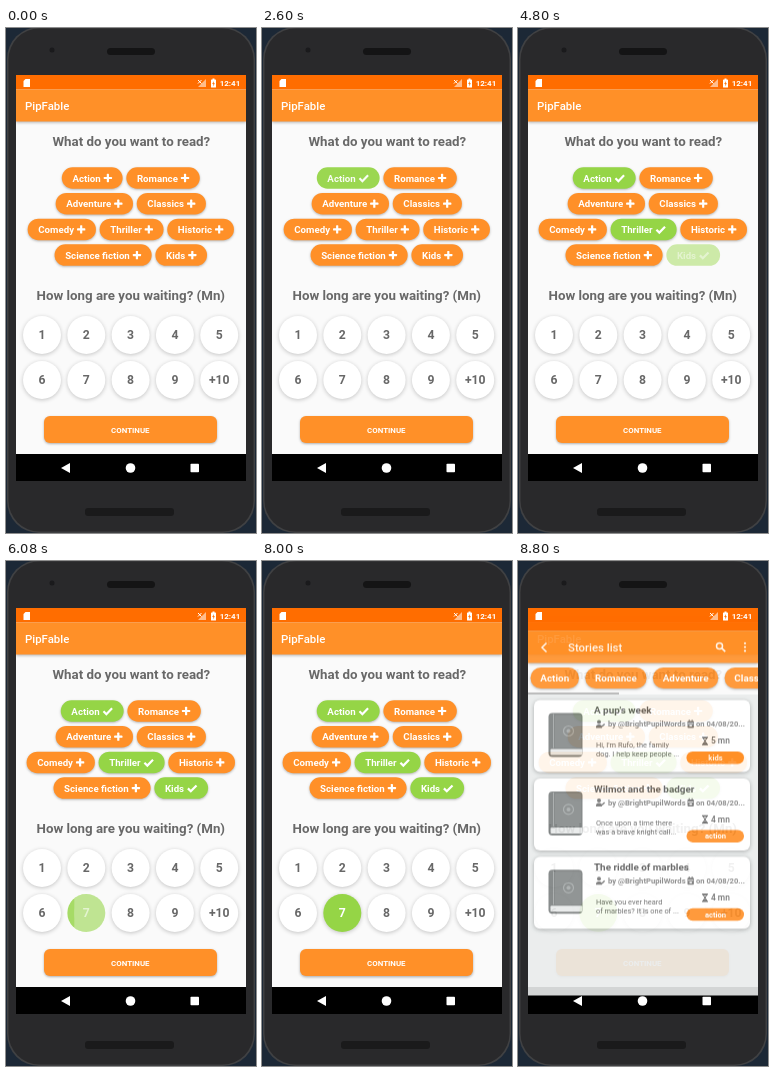
An HTML page with a canvas that plays this animation: 250 by 505 pixels, repeating every 8840 ms.

```html
<!DOCTYPE html>
<html lang="en">
<head>
<meta charset="utf-8">
<title>Story picker</title>
<style>
html, body { margin: 0; width: 100%; height: 100%; overflow: hidden; background: #1c2836; }
canvas { display: block; width: 250px; height: 505px; }
</style>
</head>
<body>
<canvas id="stage"></canvas>
<script>
const W = 250, H = 505, LOOP = 8840, TICK = 40;
const SCREEN = { x: 10, y: 47, w: 230, h: 406 };
const BAR_TOP = 61.5, BAR_END = 93.5, PAGE_END = 426;
const S = Math.max(1, window.devicePixelRatio || 1);
const ORANGE = '#ff9028', DARK_ORANGE = '#ff6d00', GREEN = '#95d546';
const GREY = '#686868', PAPER = '#fafafa';
const FONT = 'Roboto, "Open Sans", sans-serif';

const setup = c => {
  c.width = W * S;
  c.height = H * S;
  const g = c.getContext('2d');
  g.scale(S, S);
  return g;
};
const stage = setup(document.getElementById('stage'));
const listCanvas = document.createElement('canvas');
const listLayer = setup(listCanvas);
let g = stage;

// Drawing helpers
function box(x, y, w, h, r, fill) {
  g.fillStyle = fill;
  g.beginPath();
  g.roundRect(x, y, w, h, r);
  g.fill();
}
function band(y, end, fill) {
  g.fillStyle = fill;
  g.fillRect(SCREEN.x, y, SCREEN.w, end - y);
}
function dot(x, y, r, fill) {
  g.fillStyle = fill;
  g.beginPath();
  g.arc(x, y, r, 0, 7);
  g.fill();
}
function ring(x, y, r, width, color) {
  g.strokeStyle = color;
  g.lineWidth = width;
  g.beginPath();
  g.arc(x, y, r, 0, 7);
  g.stroke();
}
function line(points, width, color, close) {
  g.strokeStyle = color;
  g.lineWidth = width;
  g.beginPath();
  points.forEach(([x, y]) => g.lineTo(x, y));
  if (close) g.closePath();
  g.stroke();
}
function poly(points, fill) {
  g.fillStyle = fill;
  g.beginPath();
  points.forEach(([x, y]) => g.lineTo(x, y));
  g.fill();
}
function shadow(alpha, blur, dy, draw) {
  g.save();
  g.shadowColor = `rgba(0,0,0,${alpha})`;
  g.shadowBlur = blur * S;
  g.shadowOffsetY = dy * S;
  draw();
  g.restore();
}
function label(s, x, y, size, color, weight = 700, align = 'left') {
  g.font = `${weight} ${size}px ${FONT}`;
  g.textAlign = align;
  g.fillStyle = color;
  g.fillText(s, x, y + size * 0.35);
}
function textWidth(s, size) {
  g.font = `700 ${size}px ${FONT}`;
  return g.measureText(s).width;
}

// Touch feedback: dim at once, recover after release
const taps = {
  Action: { down: 2320, up: 2400 },
  Thriller: { down: 2840, up: 2920 },
  Kids: { down: 4640, up: 4700 },
  7: { down: 5920, up: 5960 }
};
const easeInOut = p => p < 0.5 ? 2 * p * p : 1 - 2 * (1 - p) ** 2;
function touch(name, t) {
  const tap = taps[name];
  if (!tap || t < tap.down) return { on: false, alpha: 1 };
  if (t < tap.up) return { on: false, alpha: 0.2 };
  return { on: true, alpha: 0.2 + 0.8 * easeInOut(Math.min(1, (t - tap.up) / 250)) };
}

function phone() {
  g.fillStyle = '#1c2836';
  g.fillRect(0, 0, W, H);
  box(1, -1, 248, 506, 32, '#404143');
  box(2.5, 0.5, 245, 503, 31, '#29292b');
  dot(46, 22, 2.5, '#1a1a1c');
  box(101, 20, 48, 7, 3.5, '#141415');
  box(79, 480, 89, 8, 3, '#1a1a1b');
  box(SCREEN.x, SCREEN.y, SCREEN.w, SCREEN.h, 0, '#000');
}

function statusIcons() {
  poly([[19.5, 51], [24, 51], [24, 59], [17.5, 59], [17.5, 53]], '#fff');
  g.globalAlpha = 0.55;
  poly([[200, 51], [200, 59], [192, 59]], '#fff');
  g.globalAlpha = 1;
  line([[192, 52], [195.5, 55.5]], 1, '#fff');
  line([[195.5, 52], [192, 55.5]], 1, '#fff');
  box(205, 51.5, 5, 8, 0.6, '#fff');
  box(206.5, 50.5, 2, 1.5, 0, '#fff');
  poly([[208, 53], [206.2, 56], [207.4, 56], [207, 58.5], [208.9, 55.2], [207.7, 55.2]], DARK_ORANGE);
  label('12:41', 234.3, 55.2, 8, '#fff', 700, 'right');
}

function navBar() {
  band(PAGE_END, SCREEN.y + SCREEN.h, '#000');
  poly([[55, 440], [64, 435], [64, 445]], '#fff');
  dot(124.5, 440, 4.8, '#fff');
  box(184.5, 435.8, 8.5, 8.5, 0.8, '#fff');
}

function topBars(title, x) {
  band(SCREEN.y, BAR_TOP, DARK_ORANGE);
  shadow(0.3, 3, 1, () => band(BAR_TOP, BAR_END, ORANGE));
  label(title, x, 78, 11.4, '#fff', 500);
}

const rows = [
  ['Action', 'Romance'],
  ['Adventure', 'Classics'],
  ['Comedy', 'Thriller', 'Historic'],
  ['Science fiction', 'Kids']
];
const CHIP = { size: 9.7, pad: 10.6, gap: 3.7, h: 21.5 };

function chipRow(names, y, t) {
  const chips = names.map(name => {
    const state = touch(name, t);
    const text = textWidth(name, CHIP.size);
    const icon = state.on ? 10.4 : 8.3;
    return { name, state, text, w: text + icon + 3 + CHIP.pad * 2 };
  });
  const total = chips.reduce((sum, c) => sum + c.w, CHIP.gap * (chips.length - 1));
  let x = 124.8 - total / 2;
  for (const { name, state, text, w } of chips) {
    g.globalAlpha = state.alpha;
    shadow(state.alpha < 1 ? 0 : 0.28, 2.5, 1, () =>
      box(x, y - CHIP.h / 2, w, CHIP.h, CHIP.h / 2, state.on ? GREEN : ORANGE));
    label(name, x + CHIP.pad, y + 0.3, CHIP.size, '#fff');
    const ix = x + CHIP.pad + text + 3;
    if (state.on) {
      line([[ix + 0.8, y + 0.3], [ix + 3.7, y + 3.2], [ix + 9.4, y - 2.7]], 2.2, '#fff');
    } else {
      box(ix, y - 1.1, 8.3, 2.2, 0.6, '#fff');
      box(ix + 3.05, y - 4.15, 2.2, 8.3, 0.6, '#fff');
    }
    g.globalAlpha = 1;
    x += w + CHIP.gap;
  }
}

// A recovering disc keeps a solid crescent on its left
function crescent(x, y, r) {
  g.save();
  g.beginPath();
  g.arc(x, y, r, 0, 7);
  g.rect(x + r + 7, y - r, -2 * r, 2 * r);
  g.clip();
  g.beginPath();
  g.arc(x, y, r, 0, 7);
  g.arc(x + 7, y, r, 0, 7);
  g.fillStyle = GREEN;
  g.clip('evenodd');
  g.fillRect(x - r, y - r, r, 2 * r);
  g.restore();
}

function minutes(t) {
  for (let i = 0; i < 10; i++) {
    const x = 36 + (i % 5) * 44.3, y = i < 5 ? 307 : 352;
    const name = i < 9 ? String(i + 1) : '+10';
    const { on, alpha } = touch(name, t);
    g.globalAlpha = alpha;
    shadow(alpha < 1 ? 0 : 0.22, 4, 1, () => dot(x, y, 19, on ? GREEN : '#fff'));
    if (on && alpha < 1) crescent(x, y, 19);
    label(name, x, y, 12.2, on ? '#fff' : GREY, 700, 'center');
    g.globalAlpha = 1;
  }
}

function continueButton(t) {
  let lift = Math.min(1, Math.max(0, (t - 7960) / 280));
  if (t >= 8560) lift = t < 8600 ? 0.5 : 0;
  shadow(0.3 + 0.08 * lift, 2.5 + 2 * lift, 1 + lift, () => box(38, 388, 173, 27, 6, ORANGE));
  label('CONTINUE', 124.3, 401.8, 7.9, '#fff', 700, 'center');
}

function pickPage(t) {
  band(SCREEN.y, PAGE_END, PAPER);
  topBars('PipFable', 19);
  label('What do you want to read?', 125.3, 113.5, 13.3, GREY, 700, 'center');
  rows.forEach((names, i) => chipRow(names, 150 + i * 25.7, t));
  label('How long are you waiting? (Mn)', 124.8, 267.5, 13.3, GREY, 700, 'center');
  minutes(t);
  continueButton(t);
}

const stories = [
  { title: "A pup's week", text: ["Hi, I'm Rufo, the family", 'dog. I help keep people ...'], time: '5 mn', tag: 'kids' },
  { title: 'Wilmot and the badger', text: ['Once upon a time there', 'was a brave knight call...'], time: '4 mn', tag: 'action' },
  { title: 'The riddle of marbles', text: ['Have you ever heard', 'of marbles? It is one of ...'], time: '4 mn', tag: 'action' }
];

function book(x, y) {
  box(x, y, 34, 44, 4, '#7c8080');
  box(x + 2, y + 36, 32, 6, 1, '#e8eaea');
  line([[x + 5, y + 1], [x + 5, y + 35]], 1, '#a4a8a8');
  box(x + 6.5, y + 2, 26, 33, 1, '#868a8a');
  ring(x + 20, y + 18, 5, 1.2, '#a7acac');
  dot(x + 20, y + 18, 2, '#a7acac');
}

function userIcon(x, y) {
  dot(x + 3, y - 2, 2, '#777');
  box(x, y + 0.6, 6, 3.4, [2.5, 2.5, 0, 0], '#777');
  line([[x + 6, y + 2.6], [x + 8.6, y]], 1.4, '#777');
}

function calendarIcon(x, y) {
  box(x, y - 3, 6.4, 7, 0.8, '#777');
  box(x + 1.2, y - 4.2, 1.1, 2, 0, '#777');
  box(x + 4.1, y - 4.2, 1.1, 2, 0, '#777');
  box(x + 0.6, y - 0.9, 5.2, 0.8, 0, '#fff');
  box(x + 2, y + 0.9, 2.4, 1.6, 0, '#fff');
}

function hourglass(x, y) {
  box(x, y - 4.2, 6, 1.2, 0, '#666');
  box(x, y + 3, 6, 1.2, 0, '#666');
  line([[x + 1, y - 3], [x + 5, y - 3], [x + 1, y + 3], [x + 5, y + 3]], 1, '#666', true);
  poly([[x + 1.6, y + 3], [x + 4.4, y + 3], [x + 3, y + 1]], '#666');
}

function storyCard(story, y) {
  shadow(0.3, 4, 1, () => box(16, y, 216, 72, 6, '#fff'));
  book(30.5, y + 13);
  label(story.title, 76, y + 10.5, 9.9, '#5c5c5c');
  userIcon(78, y + 24);
  label('by @BrightPupilWords', 90, y + 24, 7.7, '#858585');
  calendarIcon(169.5, y + 24);
  label('on 04/08/20...', 178, y + 24, 7.6, '#858585');
  hourglass(184, y + 41);
  label(story.time, 193, y + 41, 8.4, '#666', 500);
  story.text.forEach((s, i) => label(s, 78, y + 45 + i * 9, 7.4, '#666', 400));
  box(168.5, y + 51.5, 57.5, 12.5, 6.2, ORANGE);
  label(story.tag, 197.5, y + 57.8, 7.6, '#fff', 700, 'center');
}

function listPage() {
  band(SCREEN.y, PAGE_END, '#e9ecec');
  band(BAR_END, 125, PAPER);
  topBars('Stories list', 50);
  line([[28.5, 73.5], [24, 78], [28.5, 82.5]], 1.5, '#fff');
  ring(201.5, 76.5, 3, 1.5, '#fff');
  line([[203.7, 78.7], [207.2, 82.2]], 1.7, '#fff');
  [73.8, 77.6, 81.4].forEach(y => dot(227, y, 1.1, '#fff'));
  let x = 12.5;
  for (const name of ['Action', 'Romance', 'Adventure', 'Classics']) {
    const w = textWidth(name, 9.9) + 19.6;
    shadow(0.3, 2.5, 1, () => box(x, 98, w, 21, 10.5, ORANGE));
    label(name, x + 9.8, 108.7, 9.9, '#fff');
    x += w + 6.3;
  }
  box(SCREEN.x, 123, 91, 2, 0, '#b4b4b4');
  stories.forEach((story, i) => storyCard(story, 130.5 + i * 78.4));
}

function renderList() {
  g = listLayer;
  g.clearRect(0, 0, W, H);
  listPage();
  g = stage;
}

function draw(t) {
  phone();
  g.save();
  g.beginPath();
  g.rect(SCREEN.x, SCREEN.y, SCREEN.w, SCREEN.h);
  g.clip();
  pickPage(t);
  navBar();
  if (t >= 8760) {
    // The list fades in while rising
    const p = (t - 8757) / 62;
    renderList();
    g.globalAlpha = 1 - (1 - p) ** 2;
    g.drawImage(listCanvas, 0, 27.6 * (1 - p), W, H);
    g.globalAlpha = 1;
  }
  statusIcons();
  g.restore();
}

const start = performance.now();
function frame() {
  const t = (performance.now() - start) % LOOP;
  draw(Math.floor(t / TICK) * TICK);
  requestAnimationFrame(frame);
}
frame();
</script>
</body>
</html>
```
